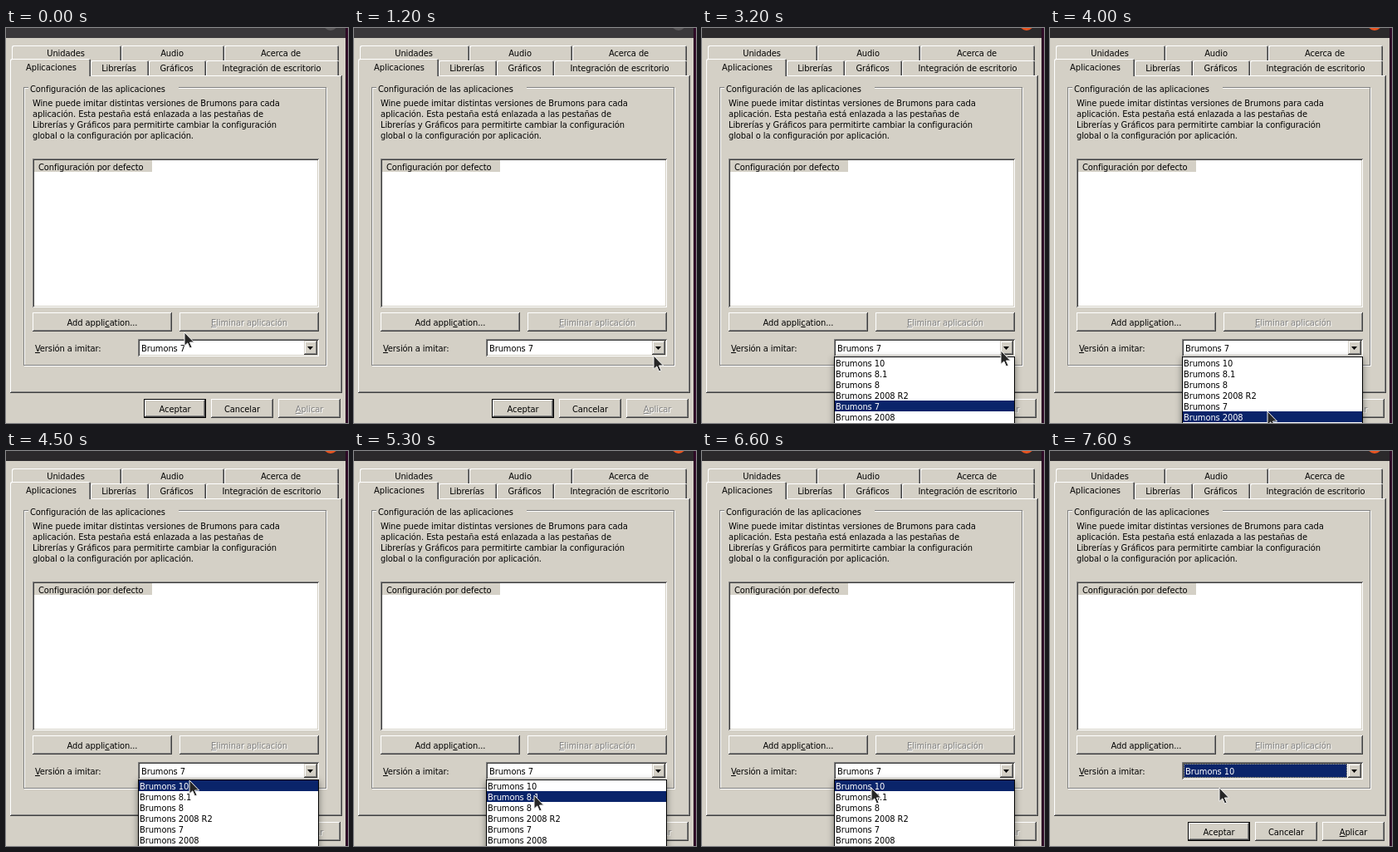
These frames come from a looping animation (412x475 px, 8 s). An HTML page:

```html
<!DOCTYPE html>
<html lang="es">
<head>
<meta charset="utf-8">
<title>Configuración</title>
<style>
html, body { margin: 0; width: 100%; height: 100%; overflow: hidden; }
#stage {
  --face: #d4d0c6; --dim: #808080; --dark: #404040;
  position: relative; width: 412px; height: 475px; overflow: hidden;
  background: var(--face); color: #000;
  font: condensed 11px/13px "DejaVu Sans Condensed", "DejaVu Sans", sans-serif;
  letter-spacing: -.085px;
}
#stage div, #stage svg { position: absolute; white-space: pre; }
.face { background: var(--face); }
.tab { border-radius: 2px 2px 0 0; background: var(--face);
  box-shadow: inset 1px 1px #fff, inset -1px 0 var(--dark), inset -2px 0 var(--dim); }
.raised { background: var(--face);
  box-shadow: inset -1px -1px var(--dark), inset 1px 1px #fff, inset -2px -2px var(--dim); }
.default { box-shadow: inset 0 0 0 1px #000, inset -2px -2px var(--dark), inset 2px 2px #fff, inset -3px -3px var(--dim); }
.drop { background: var(--face);
  box-shadow: inset -1px -1px var(--dark), inset 1px 1px var(--face), inset -2px -2px var(--dim), inset 2px 2px #fff; }
.pressed { box-shadow: inset 0 0 0 1px var(--dim); }
.sunken { background: #fff;
  box-shadow: inset 1px 1px var(--dim), inset -1px -1px #fff, inset 2px 2px var(--dark), inset -2px -2px var(--face); }
.etched { box-sizing: border-box; border: 1px solid var(--dim);
  box-shadow: 1px 1px #fff, inset 1px 1px #fff; }
.list { background: #fff; box-shadow: inset 0 0 0 1px #000, 0 2px 8px rgba(0, 0, 0, .45); }
.off { color: var(--dim); text-shadow: 1px 1px #fff; }
.on { color: #fff; background: #0a246a; }
.focus { outline: 1px dotted #d4c890; outline-offset: -1px; }
.mid { transform: translateX(-50%); }
u { text-underline-offset: 1px; text-decoration-thickness: 1px; }
</style>
</head>
<body>
<div id="stage"></div>
<script>
const stage = document.getElementById('stage');
const NAME = 'Brumons ';
const LIST_TOP = 395, ROW = 13;

function box(x, y, w, h, cls = '', parent = stage) {
  const el = document.createElement('div');
  el.className = cls;
  el.style.cssText = `left:${x}px;top:${y}px;width:${w}px;height:${h}px`;
  parent.append(el);
  return el;
}

// y is the middle of the capitals
function label(html, x, y, cls = '', parent = stage) {
  const el = document.createElement('div');
  el.className = cls;
  el.style.cssText = `left:${x}px;top:${y - 6}px`;
  el.innerHTML = html;
  parent.append(el);
  return el;
}

function button(html, x, y, w, cls = '', textCls = '') {
  box(x, y, w, 23, 'raised ' + cls);
  return label(html, x + w / 2, y + 12, 'mid ' + textCls);
}

function tabs(x, y, items) {
  for (const [text, w] of Object.entries(items)) {
    box(x, y, w, 18, 'tab');
    label(text, x + w / 2 - 1, y + 9, 'mid');
    x += w;
  }
}

// Title bar and desktop edge
const title = box(0, 0, 409, 12);
const close = box(382, -15, 18, 18);
close.style.borderRadius = '50%';
box(409, 0, 3, 475).style.background = 'linear-gradient(90deg, #240a1e, #3a0b30)';

// Tabs and page
tabs(7, 21, { Unidades: 132, Audio: 124, 'Acerca de': 138 });
tabs(102, 39, { 'Librerías': 70, 'Gráficos': 69, 'Integración de escritorio': 160 });
box(5, 57, 400, 382, 'raised');
box(5, 37, 97, 21, 'tab');
label('Aplicaciones', 54.5, 47, 'mid');

// Group
box(21, 71, 365, 335, 'etched');
box(27, 68, 181, 8, 'face');
label('Configuración de las aplicaciones', 29, 73);
[
  'Wine puede imitar distintas versiones de ' + NAME + 'para cada',
  'aplicación. Esta pestaña está enlazada a las pestañas de',
  'Librerías y Gráficos para permitirte cambiar la configuración',
  'global o la configuración por aplicación.'
].forEach((line, i) => label(line, 32, 90 + ROW * i));

box(32, 157, 345, 179, 'sunken');
box(34, 159, 142, 14, 'face');
label('Configuración por defecto', 39, 167);
button('Add appli<u>c</u>ation...', 32, 342, 168);
button('<u>E</u>liminar aplicación', 209, 342, 168, '', 'off');

// Combo
label('<u>V</u>ersión a imitar:', 35, 385);
box(159, 374, 218, 21, 'sunken');
const field = box(161, 376, 197, 17);
const value = label('', 163, 385);
const drop = box(359, 376, 16, 17, 'drop');
const arrow = box(363, 383, 7, 4);
arrow.style.background = '#000';
arrow.style.clipPath = 'polygon(0 0, 100% 0, 50% 100%)';

const [, , apply] = ['Aceptar', 'Cancelar', '<u>A</u>plicar'].map((text, i) =>
  button(text, 166 + 81 * i, 446, 75, i ? '' : 'default'));

// Open list
const list = box(159, LIST_TOP, 218, 90, 'list');
const rows = ['10', '8.1', '8', '2008 R2', '7', '2008'].map((version, i) => {
  const row = box(1, 1 + ROW * i, 216, ROW, '', list);
  label(NAME + version, 1, 7, '', row);
  return row;
});
const CURRENT = 4;

stage.insertAdjacentHTML('beforeend',
  `<svg id="cursor" width="16" height="22" viewBox="-1 -1 16 22" style="left:-1px;top:-1px">
  <path d="M0 0V16.3L3.8 12.9L6.5 19L9.1 17.9L6.4 12H11.6Z" fill="#262626" stroke="#f4f4f4"/></svg>`);
const cursor = document.getElementById('cursor');

// Pointer strokes: start, end and the place reached
const START = [215, 366];
const strokes = [
  [300, 400, 181, 330], [400, 600, 240, 248], [600, 900, 391, 352], [1000, 1200, 361, 394],
  [1400, 1700, 360, 388], [3200, 3300, 366, 412], [3500, 3600, 300, 480], [3800, 3900, 262, 461],
  [4100, 4500, 221, 396], [4900, 5700, 212, 432], [5800, 5900, 215, 438], [6000, 6600, 204, 405]
];
const LOOP = 8000, OPEN = 1900, RELEASE = 2500, ENTER = 3300, CHOOSE = 7600, TICK = 100;

const ease = k => k * k * (3 - 2 * k);

function pointer(t) {
  let [x, y] = START;
  for (const [from, to, nx, ny] of strokes) {
    if (t <= from) break;
    const k = ease(Math.min(1, (t - from) / (to - from)));
    x += (nx - x) * k;
    y += (ny - y) * k;
  }
  return [Math.round(x), Math.round(y)];
}

function draw(now) {
  const t = Math.floor((now % LOOP) / TICK) * TICK;
  const focused = t >= OPEN, chosen = t >= CHOOSE;
  const pressed = focused && t < RELEASE;
  const [x, y] = pointer(t);
  cursor.style.transform = `translate(${x}px,${y}px)`;

  title.style.background = focused ? '#2b292b' : '#3a383b';
  close.style.background = focused ? '#e95420' : '#5a585a';
  drop.classList.toggle('pressed', pressed);
  arrow.style.transform = pressed ? 'translate(1px,1px)' : '';

  // The row a few pixels below the tip lights up
  const lit = t < ENTER ? CURRENT : Math.floor((y + 2 - LIST_TOP) / ROW);
  list.style.display = focused && !chosen ? '' : 'none';
  rows.forEach((row, i) => row.classList.toggle('on', i === lit));

  value.textContent = NAME + (chosen ? '10' : '7');
  value.style.color = chosen ? '#fff' : '';
  field.className = chosen ? 'on focus' : '';
  apply.classList.toggle('off', !chosen);
}

const began = performance.now();
(function loop() {
  draw(performance.now() - began);
  requestAnimationFrame(loop);
})();
</script>
</body>
</html>
```
